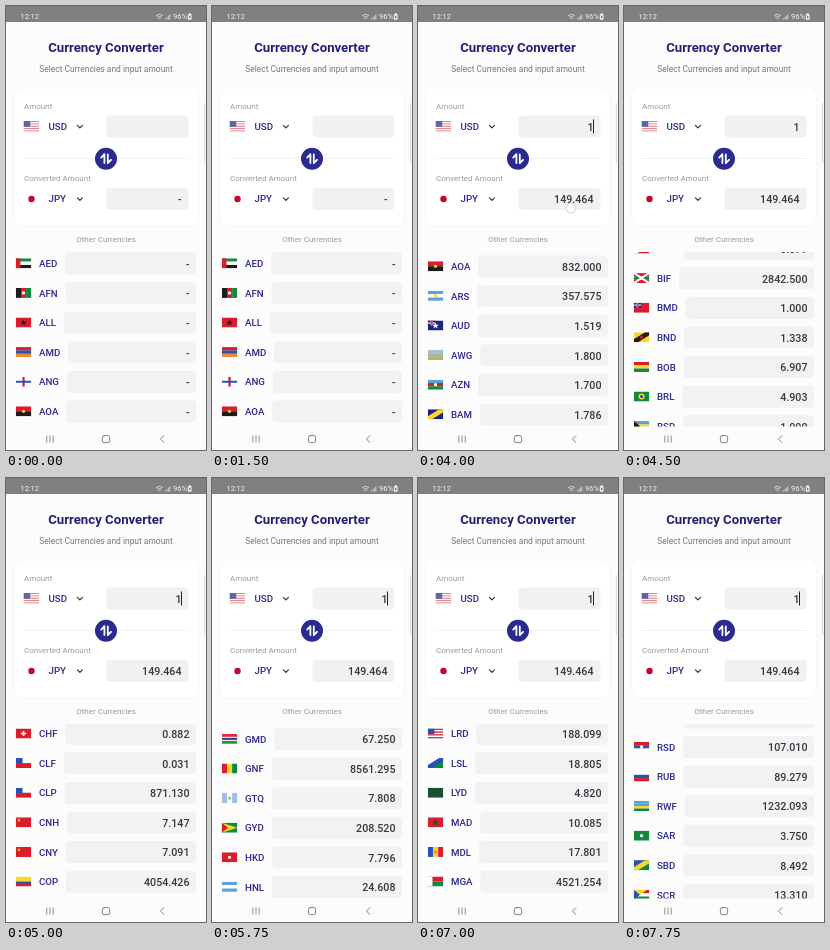
An HTML page that plays this animation: 200 px wide and 444 px high, repeating every 8000 ms.

```html
<!DOCTYPE html>
<html lang="en">
<head>
<meta charset="utf-8">
<title>Currency Converter</title>
<style>
html, body { margin: 0; width: 100%; height: 100%; overflow: hidden; background: #fcfcfd; }
#stage { display: block; width: 100vw; height: 100vh; }
text { font-family: Roboto, sans-serif; }
</style>
</head>
<body>
<svg id="stage" viewBox="0 0 200 444" preserveAspectRatio="none"></svg>
<script>
const LOOP = 8000, STEP = 250, PITCH = 29.6, TOP = 257.5;
const NAVY = '#2b2a8e', GREY = '#9a9a9e', INK = '#38383c', LIGHT = '#f2f2f2';

const COLORS = {
  r: '#d81e2c', w: '#ffffff', b: '#2453b5', n: '#1b2580', g: '#0f8a3c', G: '#175230',
  y: '#f7d72e', k: '#1c1c1c', o: '#ee8a2c', s: '#5aa2d8', l: '#9dc0dc', e: '#a9b77a',
  p: '#de8289', m: '#5967a6'
};

// Flag marks on a 15 x 10 field
const MARKS = {
  '[': 'M0 0H4.5V10H0Z',
  '<': 'M0 0L6 5L0 10Z',
  '>': 'M0 0L15 5L0 10Z',
  'c': 'M0 0H6.5V5.4H0Z',
  'o': 'M4.5 5a3 3 0 1 0 6 0a3 3 0 1 0-6 0',
  '~': 'M5.9 5a1.6 1.6 0 1 0 3.2 0a1.6 1.6 0 1 0-3.2 0',
  '*': 'M7.5 1.8l.8 2.4h2.5l-2 1.5.8 2.4-2.1-1.5-2.1 1.5.8-2.4-2-1.5h2.5z',
  't': 'M3 1l.5 1.3h1.4l-1.1.9.4 1.4-1.2-.9-1.2.9.4-1.4-1.1-.9h1.4z',
  '+': 'M6.7 2.4h1.6v1.8h1.8v1.6h-1.8v1.8h-1.6v-1.8h-1.8v-1.6h1.8z',
  'N': 'M4 0h2v4h9v2h-9v4h-2v-4h-4v-2h4z',
  'v': 'M6.4 0h2.2v10h-2.2z',
  'h': 'M0 4h15v2h-15z',
  '/': 'M0 10V7L11 0H15V3L4 10Z',
  '^': 'M0 0H13L0 9Z',
  'x': 'M0 0h2L15 9v1h-2L0 1zM15 0h-2L0 9v1h2L15 1z',
  'K': 'M0 0H7V5H0Z',
  'J': 'M2.7 0h1.6v1.7h2.7v1.6h-2.7v1.7h-1.6v-1.7h-2.7v-1.6h2.7z',
  'j': 'M3.1 0h.8v2.1h3.1v.8h-3.1v2.1h-.8v-2.1h-3.1v-.8h3.1z'
};

// Code, rate, flag: bands then marks
const RATES = `
AED 3.672 -gwk,[r AFN 69.25 |krg,~w ALL 93.65 -r,*k AMD 402.81 -rbo ANG 1.802 -w,vr,hb
AOA 832 -rk,~y ARS 357.575 -sws,~y AUD 1.519 -n,U,*w AWG 1.8 -lee AZN 1.7 -srg,~w
BAM 1.786 -n,/y BBD 2 |nyn,~k BDT 110.12 -g,or BGN 1.794 -wgr BHD 0.377 -r,[w
BIF 2842.5 -rgr,xw,~w BMD 1 -r,U BND 1.338 -y,/k,~r BOB 6.907 -ryg BRL 4.903 -g,oy,~b
BSD 1 -sys,<k BTC 0 -w,oo BTN 83.328 -yo,~w BWP 13.524 -sks BYN 3.292 -rrg,[w
BZD 2.016 -b,ow CAD 1.37 |rwwr,*r CDF 2620.4 -s,/r,ty CHF 0.882 -r,+w CLF 0.031 -wr,cb
CLP 871.13 -wr,cb CNH 7.147 -r,ty CNY 7.091 -r,ty COP 4054.426 -yybr CRC 534.16 -bwrwb
CUC 1 -bwbwb,<r CUP 24 -bwbwb,<r CVE 101.05 -bwrb CZK 22.364 -wr,<b DJF 177.98 -sg,<w
DKK 6.836 -r,Nw DOP 56.82 -br,+w DZD 134.31 |gw,*r EGP 30.905 -rwk,~y ERN 15 -gb,<r
ETB 56.03 -gyr,ob EUR 0.917 -b,oy FJD 2.241 -s,U FKP 0.798 -b,U GBP 0.798 -n,xw,vr,hr
GEL 2.704 -w,vr,hr GGP 0.798 -w,vr,hr GHS 12.018 -ryg,*k GIP 0.798 -wwr,~r GMD 67.25 -rrrwnnwggg
GNF 8561.295 |ryg GTQ 7.808 |lwl,~e GYD 208.52 -g,>y,<r HKD 7.796 -r,~w HNL 24.608 -sws
HRK 6.909 -rwb,~r HTG 132.42 -br,~w HUF 348.61 -rwg IDR 15568.2 -rw ILS 3.737 -bwwwb,~b
IMP 0.798 -r,~w INR 83.364 -owg,~b IQD 1306.2 -rwk,~g IRR 42275.5 -gwr,~r ISK 138.74 -b,Nr
JEP 0.798 -w,xr JMD 154.95 -g,xy JOD 0.709 -kwg,<r JPY 149.464 -w,or KES 152.8 -krg,~w
KGS 88.79 -r,oy KHR 4112.7 -brb,~w KMF 451.65 -ywrb,<g KPW 900 -brrb,~w KRW 1298.6 -w,or
KWD 0.308 -gwr,<k KYD 0.833 -n,U KZT 458.21 -s,oy LAK 20690.3 -rbr,~w LBP 15013.8 -rwr,~g
LKR 328.32 -r,[g LRD 188.099 -rwrwrwr,cb LSL 18.805 -g,^w,/b LYD 4.82 -G MAD 10.085 -r,*G
MDL 17.801 |byr,~o MGA 4521.254 -rg,[w MKD 56.42 -r,xy,oy MMK 2099.1 -ygr,*w MNT 3450 |rbr,ty
MOP 8.028 -g,~w MRU 39.51 -rgr,~y MUR 44.28 -rbyg MVR 15.36 -r,~g MWK 1682.7 -krg
MXN 17.168 |gwr,~o MYR 4.677 -rwrwrw,cn MZN 63.85 -gky,<r NAD 18.81 -g,^b,/r NGN 812.4 |gwg
NIO 36.595 -bwb NOK 10.682 -r,Nw NPR 133.33 -w,<r NZD 1.652 -n,U,*r OMR 0.385 -wrg,[r
PAB 1 -wr,cw PEN 3.742 |rwr PGK 3.737 -k,^r PHP 55.44 -br,<w PKR 285.1 -g,[w
PLN 4.004 -wr PYG 7437.1 -rwb QAR 3.641 -r,[w RON 4.556 |byr RSD 107.01 -rbw,~w
RUB 89.279 -wbr RWF 1232.093 -ssyg SAR 3.75 -g,~w SBD 8.492 -g,^b,/y SCR 13.31 -rwg,^y,<b`;

function el(tag, attrs, parent) {
  const node = document.createElementNS('http://www.w3.org/2000/svg', tag);
  for (const k in attrs) node.setAttribute(k, attrs[k]);
  return parent.appendChild(node);
}
const rect = (p, x, y, width, height, fill, rx = 0) => el('rect', { x, y, width, height, fill, rx }, p);
const line = (p, d, stroke, width = 1) => el('path', {
  d, stroke, fill: 'none', 'stroke-width': width, 'stroke-linecap': 'round', 'stroke-linejoin': 'round'
}, p);

// y is the middle of the capitals
function text(p, x, y, str, size, fill, weight = 400, anchor = 'start') {
  const node = el('text', {
    x, y: y + size * 0.36, 'font-size': size, fill, 'font-weight': weight, 'text-anchor': anchor
  }, p);
  node.textContent = str;
  return node;
}
const value = (p, x, y) => text(p, x, y + 0.4, '-', 10.7, INK, 500, 'end');

function flag(p, x, y, spec, height = 10) {
  const box = el('svg', { x, y, width: 15.5, height, viewBox: '0 0 15 10', preserveAspectRatio: 'none' }, p);
  const [bands, ...marks] = spec.replace('U', 'Kn,Jw,jr').split(',');
  const n = bands.length - 1;
  for (let i = 0; i < n; i++) {
    const fill = COLORS[bands[i + 1]];
    if (bands[0] === '-') rect(box, 0, i * 10 / n, 15, 10 / n + 0.05, fill);
    else rect(box, i * 15 / n, 0, 15 / n + 0.05, 10, fill);
  }
  for (const m of marks) el('path', { d: MARKS[m[0]], fill: COLORS[m[1]] }, box);
}

const svg = document.getElementById('stage');
const defs = el('defs', {}, svg);
rect(el('clipPath', { id: 'view' }, defs), 0, 246, 200, 174.5, '#000');
const shade = el('filter', { id: 'soft', x: '-10%', y: '-10%', width: '120%', height: '120%' }, defs);
el('feGaussianBlur', { stdDeviation: 1.2 }, shade);

rect(svg, 0, 0, 200, 444, '#fcfcfd');

// Status bar
rect(svg, 0, 0, 200, 16, '#808080');
text(svg, 14.5, 10.7, '12:12', 7.4, LIGHT, 400);
line(svg, 'M150.3 9.4q3.2-2.6 6.4 0M151.5 11q2-1.6 4 0M152.7 12.5q.8-.6 1.6 0', '#dcdcdc', 0.9);
for (let i = 0; i < 4; i++) rect(svg, 159.2 + i * 1.4, 12 - i * 1.2, 0.9, 1.6 + i * 1.2, '#cfcfcf');
text(svg, 167, 10.7, '96%', 7.6, LIGHT, 400);
rect(svg, 181.8, 8, 3.8, 5.8, LIGHT, 0.9);
rect(svg, 182.8, 7.2, 1.8, 1, LIGHT);
rect(svg, 182.9, 9.6, 1.6, 2.6, '#808080');

// Heading and card
text(svg, 100, 41, 'Currency Converter', 13.2, '#221f78', 700, 'middle');
text(svg, 100, 63, 'Select Currencies and input amount', 8.45, '#77777c', 400, 'middle');
rect(svg, 8, 82.8, 184, 137, '#efeff3', 8).setAttribute('filter', 'url(#soft)');
rect(svg, 8, 82.5, 184, 137, '#ffffff', 8);
text(svg, 18, 100, 'Amount', 8, GREY);
text(svg, 18, 172, 'Converted Amount', 8, GREY);
flag(svg, 17.5, 115, '-pwpwpwpwp,cm', 10.6);
el('circle', { cx: 25.5, cy: 193, r: 3.2, fill: '#c4062e' }, svg);
for (const [code, y] of [['USD', 120.5], ['JPY', 193]]) {
  text(svg, 42.5, y, code, 9.7, NAVY, 500);
  line(svg, `M71.4 ${y - 1.2}l2.5 2.5l2.5-2.5`, '#333338', 1.2);
  rect(svg, 100.5, y - 11, 82, 22, '#f1f1f3', 4);
}
const amount = value(svg, 175.5, 120.7);
const result = value(svg, 175.5, 193);
const caret = rect(svg, 175, 113.5, 1, 14, '#222226');
rect(svg, 18, 152.2, 164, 0.7, '#ececf0');
el('circle', { cx: 100, cy: 152.7, r: 11, fill: NAVY }, svg);
line(svg, 'M98.4 157v-8.8l-3.2 3.4M101.8 148.4v8.8l3.2-3.4', '#ffffff', 1.8);
text(svg, 100, 233.5, 'Other Currencies', 8, GREY, 400, 'middle');

// Currency list
const list = el('g', {}, el('g', { 'clip-path': 'url(#view)' }, svg));
const rows = [...RATES.matchAll(/([A-Z]{3}) ([\d.]+) (\S+)/g)].map(([, code, rate, spec], i) => {
  const y = TOP + i * PITCH, g = el('g', {}, list);
  flag(g, 9.8, y - 5.2, spec);
  const x = 33 + text(g, 33, y, code, 9.7, NAVY, 500).getComputedTextLength() + 7.8;
  rect(g, x, y - 11, 190 - x, 22, '#f2f2f4', 4);
  return { g, i, rate: (+rate).toFixed(3), out: value(g, 183.5, y) };
});
rect(svg, 197.9, 97, 1.3, 60, '#dedee2', 0.6);

// Number pad
const pad = el('g', {}, svg);
rect(pad, 0, 261, 200, 184, '#ebecf0');
rect(pad, 0, 261, 200, 21, '#f1f2f5');
const pale = '#c6c7cc';
el('circle', { cx: 22, cy: 271.3, r: 4.2, fill: 'none', stroke: pale, 'stroke-width': 0.9 }, pad);
line(pad, 'M20.4 270v.2M23.6 270v.2M20 272.6q2 2 4 0', pale, 0.9);
rect(pad, 64.4, 267, 3.2, 5.4, pale, 1.6);
line(pad, 'M62.8 271.2q.2 3 3.2 3q3 0 3.2-3M66 274.2v1.4', pale, 0.9);
line(pad, 'M110 267l3.7 2.1v4.4l-3.7 2.1l-3.7-2.1v-4.4z', '#4a4a50', 1.1);
el('circle', { cx: 110, cy: 271.3, r: 1.4, fill: 'none', stroke: '#4a4a50', 'stroke-width': 0.9 }, pad);
line(pad, 'M149.5 268h7.5v2.2M149.5 268q0 6 4 6.4M154 272.6l4-2.2l1 1.8l-4 2.4z', pale, 0.9);
for (let i = 0; i < 3; i++) el('circle', { cx: 185 + i * 3, cy: 271.3, r: 0.9, fill: '#444448' }, pad);

['123<', '456!', '789.', ' 0 ,'].forEach((keys, r) => [...keys].forEach((key, c) => {
  const x = 4.5 + c * 49, y = 287.8 + r * 32.8;
  const digit = /\d/.test(key);
  rect(pad, x, y + 0.7, 44.5, 29.3, '#d0d2d7', 3.5);
  rect(pad, x, y, 44.5, 29.3, digit ? '#fdfdfe' : key === ' ' ? '#dcdde1' : '#d3d5da', 3.5);
  if (/[\d.,]/.test(key)) {
    text(pad, x + 22.2, y + 14.7, key, 14.5, key === ',' ? '#9a9ba1' : '#222226', 400, 'middle');
  }
}));
line(pad, 'M169.4 297.8h10.4v9.4h-10.4l-4-4.7zM171.8 300.4l4.2 4.2M176 300.4l-4.2 4.2', '#2a2a2e', 1.2);
line(pad, 'M180 330.5v5.4q0 1.8-1.8 1.8h-11.4M170 334.4l-3.3 3.3l3.3 3.3', '#2a2a2e', 1.3);

// Navigation bar
const nav = '#737378';
line(svg, 'M40.8 430v6.2M44 430v6.2M47.2 430v6.2', nav, 0.8);
line(svg, 'M98.2 429.6h3.6q1.8 0 1.8 1.8v3.4q0 1.8-1.8 1.8h-3.6q-1.8 0-1.8-1.8v-3.4q0-1.8 1.8-1.8z', nav, 0.9);
const back = line(svg, 'M157.8 429.8l-3.3 3.3l3.3 3.3', nav, 0.9);
const down = el('g', {}, svg);
line(down, 'M152.8 431.6l3.4 3.2l3.4-3.2', nav, 0.9);
line(down, 'M183.5 431h8M183.5 433.2h8M185.2 435.4h4.6', nav, 1).setAttribute('stroke-dasharray', '.6 1.3');

const touch = el('circle', { cx: 153, r: 5, fill: '#ffffff', 'fill-opacity': 0.65, stroke: '#c2c2c6', 'stroke-width': 0.7 }, svg);

// Piecewise linear track of [time, value] points
function track(points, t) {
  const i = points.findIndex(p => p[0] > t);
  if (i === 0) return points[0][1];
  if (i < 0) return points[points.length - 1][1];
  const [t0, a] = points[i - 1], [t1, b] = points[i];
  return a + (b - a) * (t - t0) / (t1 - t0);
}
const SCROLL = [[3500, 0], [4000, 4.9], [4500, 14.5], [5000, 28.06], [5750, 53.88], [7000, 86.06], [7750, 118.61]];
const PAD = [[1875, 0], [2125, 1], [3375, 1], [3625, 0]];
const show = (node, on) => node.setAttribute('visibility', on ? 'visible' : 'hidden');

function draw(time) {
  const t = Math.floor(time / STEP) * STEP;
  const typed = t >= 2750;
  const rise = track(PAD, t);
  const scroll = track(SCROLL, t);

  amount.textContent = typed ? '1' : '';
  result.textContent = typed ? '149.464' : '-';
  show(caret, t >= 2000 && (t + 250) % 1000 < 500);

  list.setAttribute('transform', `translate(0 ${-scroll * PITCH})`);
  for (const row of rows) {
    row.g.setAttribute('display', Math.abs(row.i - scroll - 3) < 5 ? 'inline' : 'none');
    row.out.textContent = typed ? row.rate : '-';
  }

  pad.setAttribute('transform', `translate(0 ${(1 - rise) * 183})`);
  show(pad, rise > 0);
  show(down, rise > 0.4);
  show(back, rise <= 0.4);

  show(touch, t >= 3750 && t < 4250);
  touch.setAttribute('cy', track([[3750, 288], [4000, 202]], t));
}

const start = performance.now();
function tick() {
  draw((performance.now() - start) % LOOP);
  requestAnimationFrame(tick);
}
tick();
</script>
</body>
</html>
```
